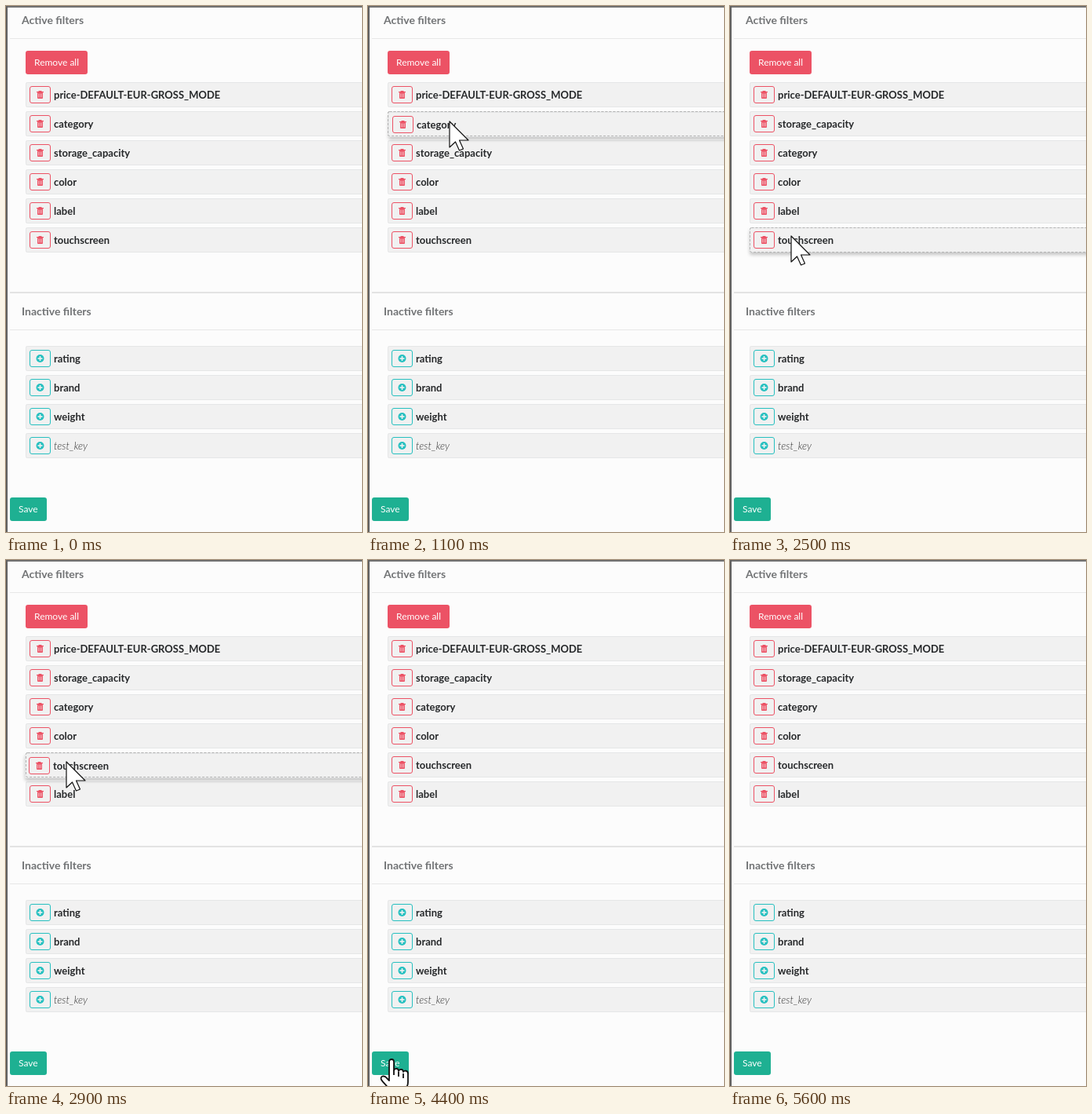
Animation of 454 by 670 pixels, one loop 5.7 s. Source, as an HTML page with a canvas:

```html
<!DOCTYPE html>
<html lang="en">
<head>
<meta charset="utf-8">
<title>Filter sorting</title>
<style>
html, body { margin: 0; width: 100%; height: 100%; overflow: hidden; background: #fcfcfc; }
canvas { display: block; }
</style>
</head>
<body>
<canvas id="stage" width="454" height="670"></canvas>
<script>
const ctx = document.getElementById('stage').getContext('2d');
const W = 454, H = 670, LOOP = 5700, STEP = 100;
const ROW_X = 25, ROW_H = 32, PITCH = 37, ACTIVE_Y = 97, INACTIVE_Y = 433;
const RED = '#ec5265', TEAL = '#26c0c0', GREEN = '#1eb092', EDGE = '#e5e6e7';

const START = ['price-DEFAULT-EUR-GROSS_MODE', 'category', 'storage_capacity', 'color', 'label', 'touchscreen'];
const INACTIVE = ['rating', 'brand', 'weight', 'test_key'];

// Pointer path: time, x, y
const PATH = [
  [600, -30, 190], [1000, 103, 146], [1100, 104, 147], [1250, 104, 147],
  [1750, 95, 192], [1950, 95, 192], [2350, 78, 293], [2500, 78, 293],
  [2900, 77, 257], [3200, 77, 257], [3700, 4, 615], [3800, 4, 615],
  [4200, 29, 636], [4950, 29, 636], [5400, -40, 690]
];
const DRAGS = [
  { name: 'category', from: 1, to: 2, start: 1050, end: 1850, x: 103, y: 146 },
  { name: 'touchscreen', from: 5, to: 4, start: 2450, end: 3100, x: 78, y: 293 }
];

const ease = u => u * u * (3 - 2 * u);

function pointerAt(t) {
  const i = PATH.findIndex(p => p[0] > t);
  if (i < 1) return null;
  const [t0, x0, y0] = PATH[i - 1], [t1, x1, y1] = PATH[i];
  const u = ease((t - t0) / (t1 - t0));
  return { x: Math.round(x0 + (x1 - x0) * u), y: Math.round(y0 + (y1 - y0) * u) };
}

function move(list, from, to) {
  list.splice(to, 0, list.splice(from, 1)[0]);
}

function box(x, y, w, h, r, fill, stroke) {
  ctx.beginPath();
  const o = stroke ? 0.5 : 0;
  ctx.roundRect(x + o, y + o, w - 2 * o, h - 2 * o, r);
  if (fill) { ctx.fillStyle = fill; ctx.fill(); }
  if (stroke) { ctx.strokeStyle = stroke; ctx.lineWidth = 1; ctx.stroke(); }
}

function rect(x, y, w, h, color) {
  ctx.fillStyle = color;
  ctx.fillRect(x, y, w, h);
}

function text(str, x, y, font, color) {
  ctx.font = font + ' Lato, sans-serif';
  ctx.fillStyle = color;
  ctx.fillText(str, x, y);
}

function trash(x, y) {
  rect(x - 4.5, y - 4, 9, 1.2, RED);
  rect(x - 2, y - 5, 4, 1, RED);
  box(x - 3.5, y - 3, 7, 8, 1, RED);
  for (let i = -1; i <= 1; i++) rect(x + i * 2 - 0.4, y - 1.5, 0.8, 5, '#f4d5d9');
}

function plus(x, y) {
  ctx.beginPath();
  ctx.arc(x, y, 5, 0, 7);
  ctx.fillStyle = TEAL;
  ctx.fill();
  rect(x - 3, y - 0.8, 6, 1.6, '#f1f1f1');
  rect(x - 0.8, y - 3, 1.6, 6, '#f1f1f1');
}

function row(name, x, y, active, hover, lifted) {
  ctx.save();
  if (lifted) {
    ctx.shadowColor = 'rgba(0,0,0,.22)';
    ctx.shadowBlur = 4;
    ctx.shadowOffsetY = 3;
  }
  box(x, y, W, ROW_H, 2, hover ? '#eeeeee' : '#f1f1f1');
  ctx.restore();
  box(x, y, W, ROW_H, 2, null, EDGE);
  box(x + 5, y + 5, 27, 22, 2.5, null, active ? RED : TEAL);
  (active ? trash : plus)(x + 18.5, y + 16);
  const soft = name === 'test_key';
  text(name, x + 36, y + 21, soft ? 'italic 300 13px' : 'bold 13px', soft ? '#333' : '#26282a');
}

function slot(y) {
  ctx.save();
  ctx.setLineDash([3, 2]);
  box(ROW_X, y, W, ROW_H, 2, null, '#b4b4b4');
  ctx.restore();
}

function outline(points) {
  ctx.beginPath();
  points.forEach(([x, y]) => ctx.lineTo(x, y));
  ctx.closePath();
}

function cursor(p, hand) {
  ctx.save();
  ctx.translate(p.x, p.y);
  ctx.lineJoin = 'round';
  if (hand) {
    ctx.beginPath();
    ctx.moveTo(-2, 3);
    ctx.bezierCurveTo(-2, -1, 4, -1, 4, 3);
    ctx.lineTo(4, 14);
    for (const x of [4, 10, 16]) {
      const y = x === 4 ? 13 : x === 10 ? 14 : 16;
      ctx.bezierCurveTo(x + 1, y - 2, x + 6, y - 2, x + 6, y + 2);
    }
    ctx.lineTo(22, 29);
    ctx.bezierCurveTo(22, 35, 19, 36, 18, 40);
    ctx.quadraticCurveTo(18, 44, 14, 44);
    ctx.lineTo(4, 44);
    ctx.quadraticCurveTo(0, 44, -1, 40);
    ctx.bezierCurveTo(-3, 35, -9, 31, -12, 26);
    ctx.bezierCurveTo(-14, 21, -8, 20, -5, 24);
    ctx.lineTo(-2, 27);
    ctx.closePath();
  } else {
    outline([[0, 0], [0, 33], [7.5, 26], [12.5, 37], [17.5, 35], [12.5, 24], [24, 24]]);
  }
  ctx.fillStyle = '#fff';
  ctx.fill();
  ctx.strokeStyle = '#111';
  ctx.lineWidth = hand ? 1.8 : 1.2;
  ctx.stroke();
  if (hand) {
    ctx.beginPath();
    for (const [x, y] of [[4, 14], [10, 16], [16, 18]]) {
      ctx.moveTo(x, y);
      ctx.lineTo(x, y + 6);
    }
    ctx.stroke();
  }
  ctx.restore();
}

function panel() {
  rect(0, 0, W, H, '#fcfcfc');
  rect(5, 41, W, 1, '#e7e7e7');
  rect(5, 364, W, 2, '#e3e3e3');
  rect(5, 412, W, 1, '#e7e7e7');
  rect(0, 0, W, 2, '#717171');
  rect(0, 0, 2, H, '#606060');
  text('Active filters', 20, 23, 'bold 14px', '#717375');
  text('Inactive filters', 20, 394, 'bold 14px', '#717375');
  box(25, 57, 79, 30, 3, RED);
  text('Remove all', 36, 76, '12px', '#fff');
  box(5, 626, 47, 30, 3, GREEN);
  text('Save', 16, 645, '12px', '#fff');
}

function draw(t) {
  const p = pointerAt(t);
  const list = START.slice();
  let drag = null, lift = 0;
  for (const d of DRAGS) {
    if (t < d.start) continue;
    if (t >= d.end) { move(list, d.from, d.to); continue; }
    drag = d;
    lift = p.y - d.y;
    if (Math.abs(lift) > PITCH / 2) move(list, d.from, d.to);
  }

  const within = y => p && !drag && p.x >= ROW_X && p.y >= y && p.y < y + ROW_H;
  let hand = p && p.x >= 5 && p.x < 52 && p.y >= 626 && p.y < 656;

  panel();
  list.forEach((name, i) => {
    const y = ACTIVE_Y + i * PITCH;
    if (drag && drag.name === name) return slot(y);
    const hover = within(y);
    hand = hand || hover;
    row(name, ROW_X, y, true, hover);
  });
  INACTIVE.forEach((name, i) => {
    const y = INACTIVE_Y + i * PITCH;
    const hover = within(y);
    hand = hand || hover;
    row(name, ROW_X, y, false, hover);
  });
  if (drag) {
    const i = list.indexOf(drag.name);
    row(drag.name, ROW_X + p.x - drag.x, ACTIVE_Y + drag.from * PITCH + lift, true, false, true);
    slot(ACTIVE_Y + i * PITCH);
  }
  if (p) cursor(p, hand);
}

function tick() {
  draw(Math.floor(performance.now() % LOOP / STEP) * STEP);
  requestAnimationFrame(tick);
}
tick();
</script>
</body>
</html>
```
